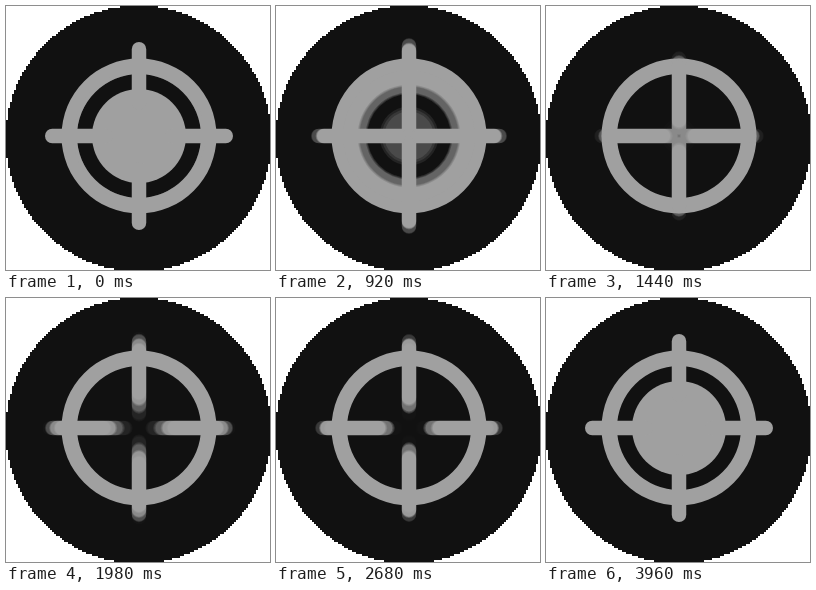
An HTML page with a canvas for the animation above (4000 ms loop, 264 by 264 pixels).

```html
<!DOCTYPE html>
<html lang="en">
<head>
<meta charset="utf-8">
<title>Crosshair pulse</title>
<style>
  html, body { margin: 0; width: 100%; height: 100%; overflow: hidden; background: #fff; }
  canvas { position: absolute; left: 0; top: 0; width: 264px; height: 264px; }
  #icon { filter: blur(0.6px); clip-path: circle(112px at 133px 130px); }
</style>
</head>
<body>
<canvas id="backdrop" width="264" height="264"></canvas>
<canvas id="icon" width="264" height="264"></canvas>
<script>
const SIZE = 264, LOOP = 4000, TICK = 20, SHUTTER = 30;
const POSES = 24; // poses in one pulse
const CX = 133, CY = 130, RING_IN = 62, RING_OUT = 77.5, BAR = 14.5;
const DARK = '#111', LIGHT = '#a0a0a0';

const view = document.getElementById('icon').getContext('2d');
const layer = document.createElement('canvas');
layer.width = layer.height = SIZE;
const pen = layer.getContext('2d');

// Time in ms and pulses completed: slow start, fast middle, long settle
const pace = [[0, 0], [920, 0.725], [1440, 2.433], [1980, 4.317],
              [2360, 5.583], [3020, 6.798], [3720, 7]];

const ramp = (k, a, b) => Math.min(1, Math.max(0, (k - a) / (b - a)));
const smooth = (k, a, b) => { const x = ramp(k, a, b); return x * x * (3 - 2 * x); };
const easeOut = (k, a, b, power) => 1 - (1 - ramp(k, a, b)) ** power;

// Radii at pose k of a pulse
const disc = k => 47 * (1 - smooth(k, 0, 6) + easeOut(k, 17, 21, 3));
const front = k => 66 * easeOut(k, 11.3, 17.3, 2);
const hole = k => RING_IN * ramp(k, 11.5, 19.5);
const outer = k => 94 + 4 * smooth(k, 0, 5) - 22 * smooth(k, 5, 12)
  + 25 * smooth(k, 13, 19.5) - 7 * smooth(k, 19, 24);
const inner = k => 26 + 4 * smooth(k, 0, 5) - 37 * smooth(k, 5, 12) + 33 * smooth(k, 17, 20);

const slope = i => (pace[i + 1][1] - pace[i][1]) / (pace[i + 1][0] - pace[i][0]);

function tangent(i) {
  if (i === 0 || i === pace.length - 1) return 0;
  const a = slope(i - 1), b = slope(i);
  return 2 * a * b / (a + b);
}

// Monotone cubic through the pace points, in poses
function progress(t) {
  const last = pace.length - 1;
  if (t >= pace[last][0]) return pace[last][1] * POSES;
  let i = 0;
  while (t >= pace[i + 1][0]) i++;
  const [t0, p0] = pace[i], [t1, p1] = pace[i + 1];
  const d = t1 - t0, s = (t - t0) / d, r = 1 - s;
  return POSES * (p0 * (1 + 2 * s) * r * r + p1 * s * s * (3 - 2 * s)
    + d * (tangent(i) * s * r * r - tangent(i + 1) * s * s * r));
}

function drawBackdrop() {
  const ctx = document.getElementById('backdrop').getContext('2d');
  const c = 132.5, r = 132.9;
  const snap = x => 2 * Math.round(x / 2);
  ctx.fillStyle = DARK;
  for (let y = 0; y < SIZE; y += 2) {
    const half = Math.sqrt(r * r - (y + 1 - c) ** 2);
    const left = snap(c - half);
    ctx.fillRect(left, y, snap(c + half) - left, 2);
  }
}

function annulus(from, to) {
  if (to <= from) return;
  pen.beginPath();
  pen.arc(CX, CY, to, 0, Math.PI * 2);
  if (from > 0) pen.arc(CX, CY, from, 0, Math.PI * 2, true);
  pen.fill('evenodd');
}

function drawPose(n) {
  const k = ((n % POSES) + POSES) % POSES;
  pen.fillStyle = DARK;
  pen.fillRect(0, 0, SIZE, SIZE);
  pen.fillStyle = pen.strokeStyle = LIGHT;
  annulus(RING_IN, RING_OUT);
  annulus(hole(k), front(k));
  annulus(0, disc(k));
  const a = inner(k) + BAR / 2, b = outer(k) - BAR / 2;
  pen.lineWidth = BAR;
  pen.lineCap = 'round';
  pen.beginPath();
  for (const [x, y] of [[1, 0], [-1, 0], [0, 1], [0, -1]]) {
    pen.moveTo(CX + x * a, CY + y * a);
    pen.lineTo(CX + x * b, CY + y * b);
  }
  pen.stroke();
}

// Average the poses the shutter passes over, each slightly smeared
function render(t) {
  const p = progress(t);
  const speed = (progress(t + 5) - progress(Math.max(0, t - 5))) / 10;
  const width = Math.max(1, speed * SHUTTER);
  const lo = p - width / 2, hi = p + width / 2;
  const smear = Math.min(0.15, speed * 4);
  let sum = 0;
  for (let n = Math.floor(lo + 0.5); n <= Math.ceil(hi - 0.5); n++) {
    const weight = Math.min(hi, n + 0.5) - Math.max(lo, n - 0.5);
    if (weight < 1e-6) continue;
    for (const side of [-1, 0, 1]) {
      sum += weight;
      drawPose(n + side * smear);
      view.globalAlpha = weight / sum;
      view.drawImage(layer, 0, 0);
    }
  }
}

drawBackdrop();
const start = performance.now();
function loop() {
  const t = (performance.now() - start) % LOOP;
  render(Math.floor(t / TICK) * TICK);
  requestAnimationFrame(loop);
}
loop();
</script>
</body>
</html>
```
